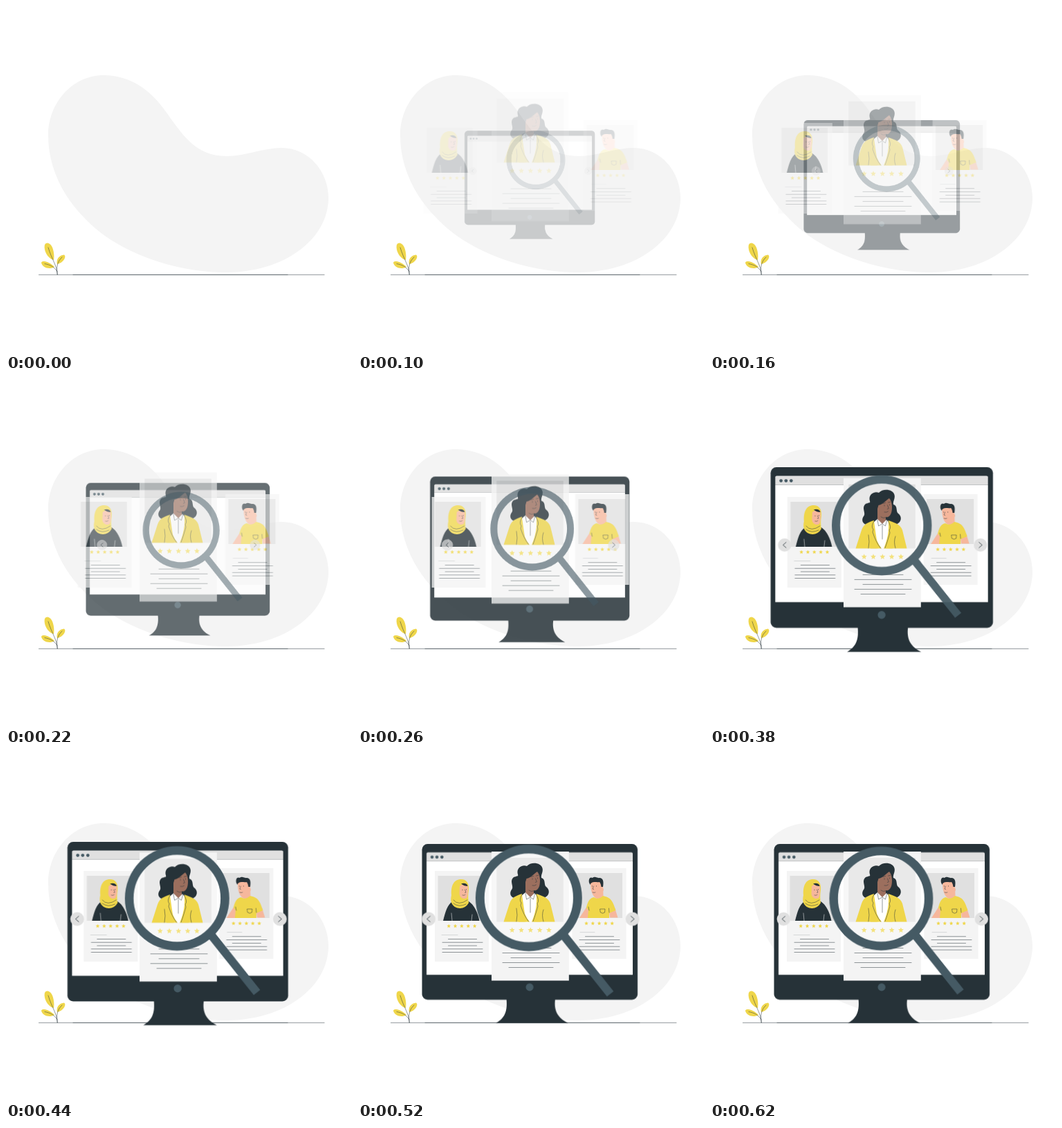
Recreate the animation shown at these times as an HTML page. Size 500 by 500 pixels, loop 640 ms.

```html
<!DOCTYPE html>
<html lang="en">
<head>
<meta charset="utf-8">
<title>Candidate search</title>
<style>
  html, body { margin: 0; width: 100%; height: 100%; overflow: hidden; background: #fff; }
  svg { display: block; width: 100%; height: 100%; }
  .line { fill: none; stroke: #263238; stroke-width: .5; stroke-linecap: round; stroke-linejoin: round; }
  .dark { fill: #263238; }
  .slate { fill: #455a64; }
  .yellow { fill: #efd64a; }
  .card { fill: #f4f4f4; }
  .photo { fill: #e0e0e0; }
  .skin { fill: #f6b79c; }
  .brown { fill: #9c6f5e; }
</style>
</head>
<body>
<svg viewBox="0 0 500 500">
  <path fill="#f4f4f4" d="M141 100C180 100 209 122 229 150C254 184 272 217 319 217C345 217 372 205 398 205C438 205 466 240 466 277C466 337 402 385 318 385C262 385 200 369 150 337C100 303 61 250 61 187C61 139 97 100 141 100Z"/>
  <path class="line" stroke-width=".5" d="M47.500 388.400H460M97 388.400H407"/>

  <g id="plant">
    <path class="yellow" d="M69 367C60 365 54 353 56 345C58 341 63 342 66 347C69 352 70 361 69 367Z"/>
    <path class="yellow" d="M74 373C72 366 77 360 84 359.500C88 362 83 371 74 373Z"/>
    <path class="yellow" d="M70 377C62 382 52 377 51 371C52 367 62 369 70 377Z"/>
    <path class="line" d="M74.500 388C74 376 66 366 61 349M74 388C72.500 378 74 369 81 363M74 384C70 377 64 374 56 372.500"/>
  </g>

  <g id="monitor">
    <path class="dark" d="M214.500 354C216 371 213 381 199.500 388.800H303.500C289 382 282.500 371 285 354Z"/>
    <rect class="dark" x="92.500" y="130" width="311.500" height="225" rx="8"/>
    <path fill="#fff" d="M99 155H397V319H99Z"/>
    <path class="photo" d="M99 155V144Q99 142 101 142H395Q397 142 397 144V155Z"/>
    <g class="slate">
      <circle cx="107" cy="149" r="2.300"/><circle cx="114" cy="149" r="2.300"/><circle cx="121.300" cy="149" r="2.300"/>
      <circle cx="248" cy="337" r="5.500"/>
    </g>
  </g>

  <g id="left">
    <rect class="card" x="111" y="169" width="78" height="131"/>
    <rect class="photo" x="115.500" y="176" width="66.500" height="65"/>
    <path class="dark" d="M123 241C126 229 129 217 137 213H160C168 218 173 229 175.500 241Z"/>
    <path class="line" style="stroke:#fff" stroke-width=".3" d="M136 241L135 230M164 241L165 232"/>
    <path class="yellow" d="M135 204C134 191 138 181 149 181C157 181 161 187 160 197C159 204 159 208 160 215C156 223 147 225 140 221C135 217 133 213 135 204Z"/>
    <path class="skin" d="M147 191C150 188 155 187 158.500 190C159.500 197 159 204 157 208C152 211 147 207 146.500 202Z"/>
    <path class="dark" d="M149 187.500C153 186 158 187 158.500 191C155 191 152 190 149 187.500Z"/>
    <path class="line" d="M151 196v.8M156.500 195.500v.8M154.500 196l1.500 4-1.500.4M151 204q2.500 1 4-.6M138 211Q145 220 158 211M138 216Q146 222 156 217"/>
  </g>

  <g id="right">
    <rect class="card" x="309.500" y="165" width="78" height="131"/>
    <rect class="photo" x="314" y="172" width="68" height="65"/>
    <path class="skin" d="M320 237L331 220L338 224L333 237ZM363 228L371 222L375.500 236.500H364Z"/>
    <path class="skin" d="M336 186C342 182 350 183 354 188L354.500 205C352 210 344 210 342 207C338 203 336 196 336 186Z"/>
    <path class="yellow" d="M330 222C332 213 335 208 341 207C345 210 350 209 354 205C365 207 368 212 372.500 226L363 230V237H332L333 226Z"/>
    <path class="dark" d="M334 186C333 181 335 177 339 179C343 176 346 180 349 179C354 179 355.500 184 354 192L351.500 192C351 188 350 186 349 185C344 186 338 183 335.500 189Z"/>
    <path class="line" d="M338.500 190.500v.8M344.500 190.500v.8M340.500 191l-1.500 4 1.500.5M339 200q2 1 4 0M350 224h7l-.5 5q-3 2.500-6 0ZM334 226l-1-5M363 229l-.5-6"/>
    <circle cx="352.500" cy="196" r="2.500" class="skin"/>
  </g>

  <g id="center">
    <rect class="card" x="193" y="141" width="111.800" height="186.500"/>
    <rect class="photo" x="200.300" y="150" width="96.500" height="92.500"/>
  </g>
  <circle id="glass" cx="247.500" cy="209" r="64" fill="#fff" fill-opacity=".3"/>

  <g id="woman">
    <path class="dark" d="M231 174C228 164 238 159 244 162C250 155 265 157 266.500 165C268 171 264 174 265 179C272 181 268 189 272 192C278 196 277 206 268 208C258 210 240 210 232 207C223 211 217 203 222 196C226 191 218 184 225 178C230 176 232 177 231 174Z"/>
    <path class="brown" d="M243.500 180C250 179 254 173 259 170C263 174 264 184 262 191C260 197 256 198 254 197V206L248 210L242 203V185Z"/>
    <path fill="#fff" d="M236 205L242 200L249 207L255 201L261 207L258 242.500H240Z"/>
    <path class="yellow" d="M237 202C228 205 222 207 219 216L210.500 242.500H242.500C241 228 238 213 237 202ZM257.500 202C266 205 275 207 278 216L284.500 242.500H254C257 230 259 214 257.500 202Z"/>
    <path class="yellow" d="M235 210Q239 232 248 242.500H232ZM259 212Q256 232 251 242.500H264Z"/>
    <path class="line" d="M237 203Q232 211 236 215L235 219Q240 234 246.500 242M257.500 203Q263 212 259 216L260 220Q256 234 253 242M229 242q2-9 0-19M268 242q-3-9 0-17M242 201l1.500 9 5.500-3 4.500 3 2-8M249 209v20"/>
    <path class="line" d="M252 180v1M259.500 179v1M250 177.500l3.500-1M257.500 176l3-.5M256.500 180l1.800 4.800-2 .7M252 190q3 1 5.500-1M247 197q3 2.500 7 1"/>
  </g>

  <g id="arrows">
    <circle class="photo" cx="106.300" cy="238.400" r="9.700"/>
    <circle class="photo" cx="392.300" cy="238.400" r="9.700"/>
    <path class="line" style="stroke-width:.8" d="M108.500 234.500L104 238.400L108.500 242.300M390.200 234.500L394.700 238.400L390.200 242.300"/>
  </g>

  <g id="lens" fill="none" stroke="#455a64">
    <circle cx="247.500" cy="209" r="68.300" stroke-width="12.400"/>
    <path stroke-width="11.800" d="M294 258.500L361.500 343.300"/>
  </g>
</svg>
<script>
const $ = id => document.getElementById(id);

function add(id, d, cls, style = '') {
  const path = document.createElementNS('http://www.w3.org/2000/svg', 'path');
  path.setAttribute('d', d);
  path.setAttribute('class', cls);
  path.style.cssText = style;
  $(id).append(path);
}

function star(cx, cy, r) {
  let d = '';
  for (let k = 0; k < 10; k++) {
    const a = k * Math.PI / 5 - Math.PI / 2, q = k % 2 ? r * .45 : r;
    d += (k ? 'L' : 'M') + (cx + q * Math.cos(a)).toFixed(2) + ' ' + (cy + q * Math.sin(a)).toFixed(2);
  }
  return d + 'Z';
}

function rating(id, x, y, gap, r) {
  for (let k = 0; k < 5; k++) add(id, star(x + k * gap, y, r), 'yellow');
}

// Text lines, alternately inset by the given amounts
function copy(id, x, y, width, gap, insets) {
  insets.forEach((inset, k) => add(id, `M${x + inset} ${y + k * gap}h${width - 2 * inset}`, 'line'));
}

rating('left', 131.2, 248.7, 9.35, 3);
rating('right', 330, 244.8, 9.3, 3);
rating('center', 222.7, 254.6, 13.3, 4.2);
copy('left', 122, 267.5, 58, 4.75, [8.5, 0, 8.5, 0, 0]);
copy('right', 320, 263.7, 58, 4.85, [8.5, 0, 8.5, 0, 0]);
copy('center', 209, 280.5, 82, 7, [12, 0, 12, 0, 9]);
add('left', 'M121 261.500h23', 'line', 'opacity:.3');
add('right', 'M321 257.600h21', 'line', 'opacity:.3');

// Cubic bezier with an overshoot near the end
function ease(x) {
  if (x <= 0) return 0;
  if (x >= 1) return 1;
  const curve = (u, a, b) => 3 * (1 - u) ** 2 * u * a + 3 * (1 - u) * u * u * b + u ** 3;
  let lo = 0, hi = 1;
  for (let i = 0; i < 30; i++) {
    const mid = (lo + hi) / 2;
    if (curve(mid, .36, .5) < x) lo = mid; else hi = mid;
  }
  return curve(lo, -.01, 1.38);
}

const LOOP = 640, TICK = 20, HOLD = 40;
const zoom = p => `scale(${.5 + p / 2})`;
const slide = (dx, dy) => p => `translate(${dx * (1 - p)}px, ${dy * (1 - p)}px)`;

// id, lead-in ms, duration ms, movement, origin
const parts = [
  ['monitor', 20, 500, zoom, '248.200px 257px'],
  ['left', 20, 540, slide(-20, 0)],
  ['right', 20, 540, slide(20, 0)],
  ['center', 20, 540, slide(0, -20)],
  ['woman', 20, 540, slide(0, -20)],
  ['arrows', 35, 630, zoom, '249.300px 238.400px'],
  ['glass', 30, 660, zoom, '269.500px 240.500px'],
  ['lens', 30, 660, zoom, '269.500px 240.500px'],
];

for (const [id, lead, span, move, origin] of parts) {
  const el = $(id), frames = [];
  if (origin) el.style.transformOrigin = origin;
  for (let t = 0; t <= LOOP; t += TICK) {
    const p = t < HOLD ? 0 : ease((t + lead) / span);
    frames.push({
      offset: t / LOOP,
      transform: move(p),
      opacity: Math.max(0, Math.min(1, p)),
      easing: 'steps(1, end)',
    });
  }
  el.animate(frames, { duration: LOOP, iterations: Infinity });
}
</script>
</body>
</html>
```
